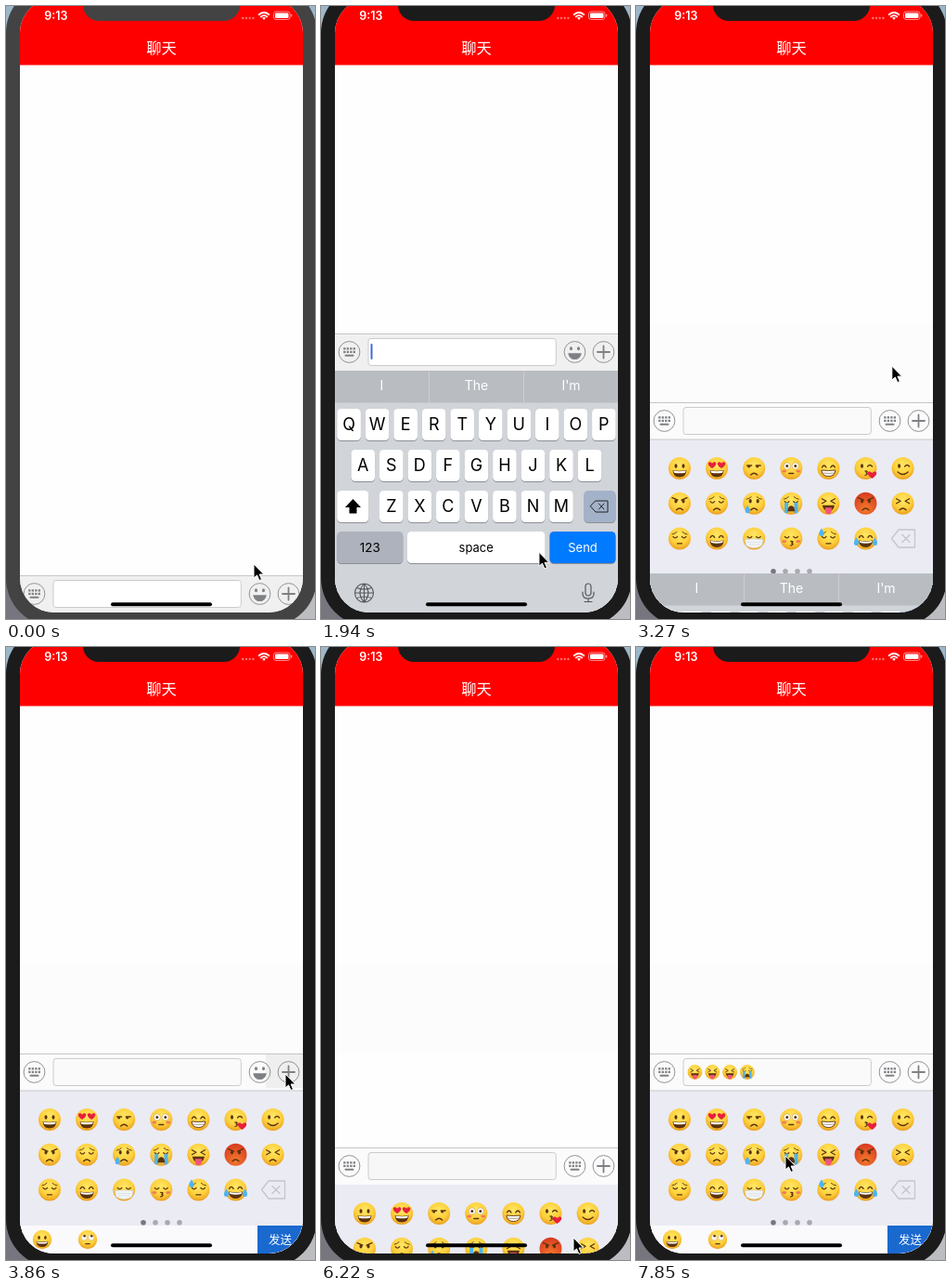
An HTML page for the animation above (8000 ms loop, 333x659 px).

```html
<!DOCTYPE html>
<html lang="zh">
<head>
<meta charset="utf-8">
<style>
html, body { margin: 0; width: 100%; height: 100%; overflow: hidden; }
svg { display: block; width: 333px; height: 659px; }
text { font-family: Inter, "Noto Sans CJK SC", "Noto Sans CJK", sans-serif; text-anchor: middle; }
</style>
</head>
<body>
<script>
const rect = (x, y, w, h, fill, rx = 0, more = '') =>
  `<rect x="${x}" y="${y}" width="${w}" height="${h}" fill="${fill}" rx="${rx}" ${more}/>`;
const oval = (x, y, rx, ry, fill, more = '') =>
  `<ellipse cx="${x}" cy="${y}" rx="${rx}" ry="${ry}" fill="${fill}" ${more}/>`;
const dot = (x, y, r, fill, more) => oval(x, y, r, r, fill, more);
const fillPath = (d, fill, more = '') => `<path d="${d}" fill="${fill}" ${more}/>`;
const line = (d, color, w = 1) =>
  `<path d="${d}" fill="none" stroke="${color}" stroke-width="${w}" stroke-linecap="round" stroke-linejoin="round"/>`;
const text = (s, x, y, size, fill, more = '') =>
  `<text x="${x}" y="${y}" font-size="${size}" fill="${fill}" ${more}>${s}</text>`;
const at = (x, y, body, scale = 1) =>
  `<g transform="translate(${x} ${y}) scale(${scale})">${body}</g>`;
const group = (id, body) => `<g id="${id}">${body}</g>`;

// Faces, drawn in a circle of radius 12
const BROWN = '#5c330c', BLUE = '#4fb4ee', RED = '#e8203c';
const ink = (d, w = 1.3) => line(d, BROWN, w);
const heart = (x, y, s) => at(x, y, fillPath('M0 4C-9-2-3-6 0-2C3-6 9-2 0 4Z', RED), s);
const drop = (x, y) => at(x, y, fillPath('M0-4Q3 0 2.5 2A2.5 2.5 0 0 1-2.5 2Q-3 0 0-4Z', BLUE));
const eye = x => oval(x, -2.5, 1.5, 2.3, BROWN);
const openEye = (x, px, py) => dot(x, -2.5, 3.6, '#fff', 'stroke="#b98a3a" stroke-width=".5"') + dot(x + px, -2.5 + py, 1.5, BROWN);
const part = {
  eyes: eye(-4) + eye(4),
  happy: ink('M-7-1q2.3-4 4.6 0M2.4-1q2.3-4 4.6 0'),
  shut: ink('M-7-2q2.3 3 4.6 0M2.4-2q2.3 3 4.6 0'),
  squeeze: ink('M-7-5L-2.5-2.5L-7 0M7-5L2.5-2.5L7 0'),
  side: ink('M-7.5-3h5M2-3h5') + dot(-5.5, -1.8, 1.3, BROWN) + dot(3.5, -1.8, 1.3, BROWN),
  wink: eye(-4) + ink('M2-2q2.5-3 5 0'),
  wide: openEye(-4.5, 0, 0) + openEye(4.5, 0, 0),
  roll: openEye(-4.5, .5, -1.8) + openEye(4.5, .5, -1.8),
  hearts: heart(-5, -3.5, .9) + heart(5, -3.5, .9),
  brows: ink('M-8-6L-2-3.5M8-6L2-3.5'),
  sad: ink('M-8-4.5Q-5-5-3-7M8-4.5Q5-5 3-7', .9),
  grin: fillPath('M-7.5 2Q0 3.5 7.5 2Q7 9.5 0 9.5T-7.5 2Z', BROWN) + fillPath('M-6.8 2.5Q0 4 6.8 2.5L6 4.7Q0 6-6 4.7Z', '#fff'),
  teeth: fillPath('M-7.5 2Q0 3 7.5 2Q7 8.5 0 8.5T-7.5 2Z', '#fff', `stroke="${BROWN}" stroke-width=".9"`) + ink('M-6.5 5Q0 6 6.5 5', .5),
  smile: ink('M-5.5 4Q0 9 5.5 4'),
  frown: ink('M-3.5 7Q0 3.5 3.5 7'),
  flat: ink('M-2.5 5.5h5'),
  kiss: ink('M-.5 3q4 0 1 2q3 1-1 2.5'),
  loveKiss: heart(7, 7, 1),
  blush: oval(-7.5, 3, 2.5, 1.5, '#f2795a') + oval(7.5, 3, 2.5, 1.5, '#f2795a'),
  tongue: fillPath('M-6.5 2H6.5Q6 8 0 8T-6.5 2Z', BROWN) + fillPath('M-3.5 4.5H3.5V8Q3 11.5 0 11.5T-3.5 8Z', '#f0557b'),
  wail: fillPath('M-4 8.5Q-3.5 2.5 0 2.5T4 8.5Z', BROWN),
  streams: rect(-7.2, -1, 4, 11.5, BLUE, 1) + rect(3.2, -1, 4, 11.5, BLUE, 1),
  tearL: drop(-7, 6), tearR: drop(7, 6),
  sweat: drop(-7.5, -7),
  joy: drop(-10, 3) + drop(10, 3),
  mask: fillPath('M-10 1Q0 0 10 1L8.5 7.5Q0 13-8.5 7.5Z', '#f1f4f7', 'stroke="#c5ccd4" stroke-width=".6"') + line('M-7 4H7M-6 6.5H6', '#d3d9df', .6)
};
const face = (x, y, parts, scale = 1) => {
  const names = parts.split(' ');
  return at(x, y, dot(0, 0, 12, names[0] === 'angry' ? 'url(#red)' : 'url(#yellow)') +
    names.map(n => part[n] || '').join(''), scale);
};
const FACES = [
  ['eyes grin', 'hearts grin', 'side frown', 'wide blush flat', 'happy teeth', 'wink kiss loveKiss', 'wink smile'],
  ['eyes brows frown', 'shut sad frown', 'eyes sad frown tearL', 'shut sad streams wail', 'squeeze tongue', 'angry eyes brows frown', 'squeeze frown'],
  ['shut sad flat', 'happy grin', 'shut mask', 'shut kiss blush', 'shut sad flat sweat', 'happy grin joy']
];

// Round toolbar icons
const GREY = '#7e8084';
const ring = '<circle r="11.4" fill="none" stroke="#929292"/>';
const four = [0, 1, 2, 3];
const icon = {
  keys: ring + four.map(i => rect(-6.3 + i * 3.5, -4.8, 2.3, 2.3, GREY) + rect(-6.3 + i * 3.5, -1.2, 2.3, 2.3, GREY)).join('') + rect(-5, 2.8, 10, 2, GREY, 1),
  smile: ring + oval(-4, -3.8, 1.5, 2, GREY) + oval(4, -3.8, 1.5, 2, GREY) + fillPath('M-7.3 1.2H7.3Q6 8 0 8T-7.3 1.2Z', GREY),
  plus: ring + line('M-6.5 0H6.5M0-6.5V6.5', GREY, 1.8),
  voice: ring + dot(-4, 0, 1.6, GREY) + line('M-1.5-3.5Q1.5 0-1.5 3.5M1.5-6Q6 0 1.5 6', GREY, 1.8)
};

const key = (label, x, y, w, fill = '#fff', size = 18, color = '#000') =>
  rect(x, y + 1, w, 34, '#8d9096', 4.5) + rect(x, y, w, 34, fill, 4.5) +
  text(label, x + w / 2, y + 17 + size * .36, size, color);
const letters = (row, x, y) => [...row].map((c, i) => key(c, x + i * 30.53, y, 25.6)).join('');

const keyboard =
  rect(15, 0, 305, 280, '#d1d4d9') + rect(15, 0, 305, 34.5, '#b9bdc2') +
  line('M116.5 1V34M218.5 1V34', '#cbced2') +
  ['I', 'The', 'I\'m'].map((s, i) => text(s, 65.5 + i * 102, 20.8, 14, '#fff')).join('') +
  letters('QWERTYUIOP', 17.3, 41) + letters('ASDFGHJKL', 32.5, 85) + letters('ZXCVBNM', 63, 129) +
  key('', 17.3, 129, 34) + fillPath('M34.5 138L43 147H38.5V153.500H30.500V147H26Z', '#000') +
  key('', 283.500, 129, 34, '#a3b2c9') +
  line('M296 140H309V152H296L290.500 146ZM299.500 143L305 149M305 143L299.500 149', '#222') +
  key('123', 17.3, 173, 71, '#adb2bc', 13.5) + key('space', 93, 173, 148.500, '#fff', 13) +
  key('Send', 246.500, 173, 71, '#007aff', 13, '#fff') +
  at(46.5, 239, line('M-10 0A10 10 0 1 1 10 0A10 10 0 1 1-10 0M0-10V10M-10 0H10M0-10Q-9 0 0 10M0-10Q9 0 0 10M-8-5.500Q0-2.500 8-5.500M-8 5.500Q0 2.500 8 5.500', '#55585e', 1.1)) +
  at(288, 239, rect(-3, -10, 6, 13, 'none', 3, 'stroke="#55585e" stroke-width="1.2"') + line('M-6-1V1Q-6 6 0 6T6 1V-1M0 6V9.500M-4 9.500H4', '#55585e', 1.2));

const emojis =
  rect(15, 0, 305, 200, '#ebebf4') +
  FACES.map((row, r) => row.map((f, c) => face(47 + c * 40.1, 31 + r * 37.7, f)).join('')).join('') +
  line('M283 97H300.500V116H283L275.500 106.500ZM287 102.500L295 110.500M295 102.500L287 110.500', '#c5c5cb', 1.3) +
  four.map(i => dot(148 + i * 13, 141.700, 2.8, i ? '#a9a9ae' : '#77777c')).join('') +
  rect(15, 145, 305, 60, '#fafafc') + face(39, 160, 'eyes grin', .85) + face(88, 160, 'roll flat', .85) +
  rect(271, 145, 49, 60, '#1a69cf') + text('发送', 295.5, 164.5, 12.5, '#fff');

const bar =
  rect(15, 0, 305, 40, '#f0f0f0', 0, 'id="barBg"') + group('plusBg', rect(280, 1, 40, 36, '#efefef')) +
  rect(15, 0, 305, 1, '#c6c6c6') + group('barEdge', rect(15, 39.500, 305, 1, '#c9c9cc')) +
  rect(51, 5.500, 202.300, 29, '#fff', 3, 'id="field" stroke="#cbcbcb"') +
  group('caret', rect(53.5, 11, 2, 17, '#4268e0', 1)) +
  group('hold', text('按住 说话', 152.2, 25.2, 15, '#515151')) +
  four.map(i => group('typed' + i, face(63.5 + i * 18.8, 20, FACES[1][i < 3 ? 4 : 3], .66))).join('') +
  at(30.5, 20, group('leftKeys', icon.keys) + group('leftVoice', icon.voice)) +
  at(273.5, 20, group('press', dot(0, 0, 11.4, '#d6d6d6')) + group('midSmile', icon.smile) + group('midKeys', icon.keys)) +
  at(304.5, 20, icon.plus);

const status =
  text('9:13', 53.8, 14.5, 12.5, '#fff', 'font-weight="600"') +
  four.map(i => dot(255.3 + i * 3.7, 13, 1.2, '#ff7070')).join('') +
  at(278, 14, line('M-5.300-4.800Q0-9.300 5.300-4.800M-3.200-2.500Q0-5.200 3.200-2.500', '#fff', 1.8) + fillPath('M-1.900-1.200Q0-2.600 1.900-1.200L0 1Z', '#fff')) +
  rect(288.500, 6, 17.500, 8.500, 'none', 2.500, 'stroke="#ff8c8c"') + rect(290, 7.500, 14.500, 5.500, '#fff', 1.300) +
  rect(307, 8.700, 1.300, 3, '#ff8c8c', .6);

document.body.innerHTML = `<svg viewBox="0 0 333 659">
<defs>
  <radialGradient id="yellow" cy=".35" r=".68"><stop stop-color="#ffe765"/><stop offset=".6" stop-color="#fdcf3b"/><stop offset="1" stop-color="#e99a1c"/></radialGradient>
  <radialGradient id="red" cy=".75" r=".8"><stop stop-color="#f5792c"/><stop offset="1" stop-color="#d5351f"/></radialGradient>
  <clipPath id="screen">${rect(15, -8, 305, 660, '#000', 37)}</clipPath>
</defs>
${rect(0, 0, 333, 330, '#9cb7c9') + rect(0, 330, 160, 329, '#77757e') + rect(160, 330, 173, 329, '#bcbdc0')}
<g id="shell">${rect(0, -23, 335, 690, 'inherit', 52).replace('fill="inherit"', '')}</g>
<g clip-path="url(#screen)">
  ${rect(15, -8, 305, 660, '#fefefe') + group('tint', rect(15, 341, 305, 96, '#fcfcfc'))}
  ${group('cover', rect(15, 0, 305, 300, '#f0f0f0')) + group('emojis', emojis) + group('bar', bar) + group('keyboard', keyboard)}
  ${rect(15, -8, 305, 71.5, '#f00') + text('聊天', 167.5, 50.8, 16.3, '#fff') + status}
  ${rect(113, 641.3, 109, 4, '#000', 2)}
</g>
${fillPath('M83-9V-1A17 17 0 0 0 100 16H235A17 17 0 0 0 252-1V-9Z', 'inherit', 'id="notch"').replace('fill="inherit"', '')}
${group('cursor', fillPath('M0 0V15L3.500 11.900L6 17.500L8.500 16.400L6.100 11H10.800Z', '#000', 'stroke="#fff" stroke-width="1"'))}
</svg>`;

const el = id => document.getElementById(id);
const show = (id, on) => el(id).setAttribute('display', on ? 'inline' : 'none');
const move = (id, x, y) => el(id).setAttribute('transform', `translate(${x} ${y})`);
const fill = (id, c) => el(id).setAttribute('fill', c);

// Keys are [step, value...]; the values between two keys are interpolated
function track(keys, n, ease = u => u) {
  const i = keys.findIndex(k => k[0] > n);
  if (i === 0) return keys[0].slice(1);
  if (i < 0) return keys[keys.length - 1].slice(1);
  const a = keys[i - 1], b = keys[i], u = ease((n - a[0]) / (b[0] - a[0]));
  return a.slice(1).map((v, j) => v + (b[j + 1] - v) * u);
}
const smooth = u => u * u * (3 - 2 * u);

const BAR = [[10, 612], [11, 576], [12, 425], [13, 352], [14, 341], [20, 341], [21, 368], [22, 426], [23, 437],
  [33, 437], [34, 448], [35, 540], [36, 604], [37, 612], [41, 612], [42, 538], [43, 450], [44, 437]];
const KEYBOARD = [[20, 381], [21, 440], [22, 610], [23, 660]];
const CURSOR = [[1, 267, 600], [5, 229, 629], [11, 229, 629], [19, 267, 362], [20, 267, 362], [26, 301, 459],
  [27, 301, 459], [32, 21, 460], [34, 21, 460], [41, 272, 638], [42, 272, 635], [47, 222, 549], [50, 222, 549], [53, 161, 547]];

const STEP = 148.15, LOOP = 8000;

function draw(ms) {
  const n = Math.floor((ms % LOOP + 5) / STEP);
  const within = (a, b) => n >= a && n <= b;
  const [y] = track(BAR, n);
  const voice = within(34, 41), pale = n > 20 && !voice;

  fill('shell', n < 7 ? '#434343' : '#1b1b1b');
  fill('notch', n < 7 ? '#434343' : '#1b1b1b');
  move('bar', 0, y);
  move('cover', 0, y + 40);
  move('emojis', 0, y + 40);
  move('keyboard', 0, n <= 20 ? y + 40 : track(KEYBOARD, n)[0]);
  move('cursor', ...track(CURSOR, n, smooth));

  fill('barBg', pale ? '#fbfbfb' : '#f0f0f0');
  fill('field', voice ? '#efefef' : n === 42 ? '#f7f7f7' : pale ? '#fafafa' : '#fff');
  show('tint', n > 20);
  show('emojis', within(21, 27) || n >= 42);
  show('barEdge', pale && n !== 42);
  show('plusBg', within(26, 33));
  show('caret', within(11, 20));
  show('press', n === 20);
  show('hold', voice);
  show('leftVoice', voice);
  show('leftKeys', !voice);
  const midKeys = within(21, 25) || n >= 42;
  show('midKeys', midKeys);
  show('midSmile', !midKeys);
  four.forEach(i => show('typed' + i, n >= (i < 3 ? 48 + i : 53)));
}

const start = performance.now();
function tick(now) {
  draw(Math.max(0, now - start));
  requestAnimationFrame(tick);
}
draw(0);
requestAnimationFrame(tick);
</script>
</body>
</html>
```
